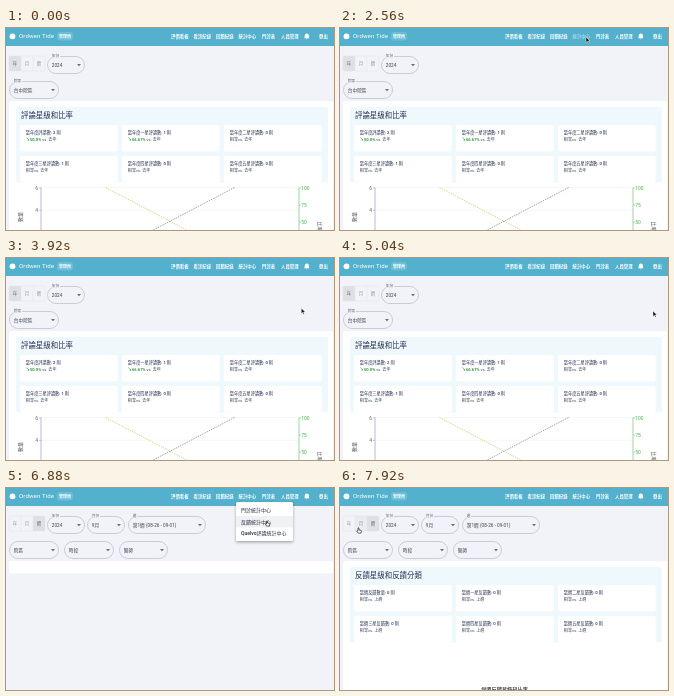
Recreate the animation shown at these times as an HTML page. Size 328 px wide and 202 px high, loop 8 s.

```html
<!DOCTYPE html>
<html lang="zh-Hant">
<head>
<meta charset="utf-8">
<title>Clinic dashboard</title>
<style>
  html, body { margin: 0; width: 100%; height: 100%; overflow: hidden; background: #f2f3f9; }
  svg { display: block; width: 100vw; height: 100vh; }
  text { font-family: Roboto, "Noto Sans CJK TC", "Noto Sans CJK JP", "Noto Sans CJK", sans-serif; white-space: pre; }
</style>
</head>
<body>
<svg id="stage" viewBox="0 0 328 202" preserveAspectRatio="none"></svg>
<script>
const LOOP = 8000, STEP = 80;
const INK = '#3c424d', NAVY = '#263052', TEAL = '#53b1cd', GREEN = '#2f8f3c';
const PURPLE = '#8f8cba', LIME = '#62b866';

const rect = (x, y, w, h, fill, r = 0, extra = '') =>
  `<rect x="${x}" y="${y}" width="${w}" height="${h}" rx="${r}" fill="${fill}" ${extra}/>`;
// y is the vertical middle of the glyphs
const text = (x, y, s, size = 4.3, fill = INK, extra = '') =>
  `<text x="${x}" y="${y + size * 0.36}" font-size="${size}" fill="${fill}" ${extra}>${s}</text>`;
const group = (id, body) => `<g id="${id}">${body}</g>`;

function header() {
  const links = [[165, '評價看板'], [187.5, '看診紀錄'], [210, '回饋紀錄'],
    [232.5, '統計中心', 'id="navStats"'], [256, '門診表'], [275, '人員管理'], [313, '登出']];
  return rect(0, 0, 328, 18, TEAL) +
    '<circle cx="6.5" cy="8.3" r="2.9" fill="#fff"/>' +
    text(13, 8.3, 'Ordwen Tide', 6.1, '#fff', 'letter-spacing=".1"') +
    rect(51, 4, 16, 8.5, '#6dbed5', 3) +
    text(53, 8.2, '管理員', 4, '#fff', 'font-weight="700"') +
    '<circle id="ripple" cx="246" cy="10" fill="#fff"/>' +
    links.map(([x, s, id]) => text(x, 8.2, s, 4.4, '#fff', 'font-weight="700" ' + (id || ''))).join('') +
    '<path d="M298.7 9.6V7.6a2.1 2.1 0 0 1 4.2 0v2l.7.7h-5.6zM300 10.7h1.6l-.8.7z" fill="#fff"/>';
}

function toggle(active) {
  return rect(3, 28, 36, 15, '#f2f3f9', 1.5) +
    rect(3 + active * 12, 28, 12, 15, '#dfe0e5', 1.5) +
    (active === 2 ? rect(15, 28, 12, 15, '#eaebf0', 0, 'id="monthHover" opacity="0"') : '') +
    rect(3, 28, 36, 15, 'none', 1.5, 'stroke="#dfe0e6" stroke-width=".5"') +
    '<path d="M15 28v15M27 28v15" stroke="#dfe0e6" stroke-width=".5"/>' +
    ['年', '月', '週'].map((s, i) =>
      text(6.8 + i * 12, 35.3, s, 4.4, i === active ? '#666a72' : '#94979e')).join('');
}

function select(x, y, w, value, label) {
  const cap = label ? rect(x + 4, y - 0.5, label.length * 3.7 + 1.6, 2, '#f2f3f9') +
    text(x + 4.8, y + 0.1, label, 3.7, '#61656f') : '';
  return rect(x + 0.5, y + 0.5, w - 1, 17, 'none', 8.5, 'stroke="#bcbec5" stroke-width=".7"') + cap +
    text(x + 4.8, y + 9, value, 4.7, INK) +
    `<path d="M${x + w - 8} ${y + 8}h4l-2 2.2z" fill="#6c6f76"/>`;
}

function cards(title, rows) {
  return rect(10, 79, 312, 75.5, '#eff8fd', 2) +
    text(15, 87, title, 7.45, NAVY, 'font-weight="500"') +
    rows.map(([name, note, drop], i) => {
      const x = 14 + (i % 3) * 102, y = i < 3 ? 97 : 128;
      const mark = drop ? `<tspan fill="${GREEN}" font-weight="700">${drop}</tspan> ` : '';
      return rect(x, y, 97.7, 26.5, '#fff', 2) +
        text(x + 5.8, y + 7.3, name, 4.2, NAVY, 'font-weight="500"') +
        text(x + 5.8, y + 14.2, mark + note, 4.1, '#3f475c');
    }).join('');
}

function chart() {
  const left = [[160, '6'], [182.3, '4']], right = [[160, '100'], [177, '75'], [194, '50']];
  const side = (x, y, s, deg) =>
    `<text transform="translate(${x} ${y}) rotate(${deg})" font-size="5" fill="#555" text-anchor="middle">${s}</text>`;
  return '<path d="M35 159.5H293M35 182.3H293" stroke="#ececef" stroke-width=".5"/>' +
    `<path d="M35 159.5V202" stroke="${PURPLE}" stroke-width=".6"/>` +
    `<path d="M293 159.5V202" stroke="${LIME}" stroke-width=".6"/>` +
    left.map(([y, s]) => `<path d="M33 ${y}h2" stroke="${PURPLE}" stroke-width=".5"/>` +
      text(32, y, s, 4.9, '#5d5b7c', 'text-anchor="end"')).join('') +
    right.map(([y, s]) => `<path d="M293 ${y}h2" stroke="${LIME}" stroke-width=".5"/>` +
      text(295.2, y, s, 4.9, '#4caf50')).join('') +
    side(16.2, 189, '數量', -90) + side(311.5, 198.5, '比率', 90) +
    // two categories, centred on the quarters of the plot
    '<g fill="none" stroke-width=".75" stroke-dasharray="1.5 1">' +
    '<path d="M99.5 159.5L228.5 227" stroke="#c3c873"/><path d="M228.5 159.5L99.5 227" stroke="#85858c"/></g>';
}

const yearly = [
  ['當年度評論數: 2 則', 'vs. 去年', '↘50.0%'],
  ['當年度一星評論數: 1 則', 'vs. 去年', '↘66.67%'],
  ...['二星評論數: 0', '三星評論數: 1', '四星評論數: 0', '五星評論數: 0']
    .map(s => [`當年度${s} 則`, '相等vs. 去年'])];
const weekly = ['反饋數量', '一星反饋數', '二星反饋數', '三星反饋數', '四星反饋數', '五星反饋數']
  .map(s => [`當週${s}: 0 則`, '相等vs. 上週']);

const reviewPage = toggle(0) + select(41, 28, 38, '2024', '年份') + select(3, 53, 50, '台中院區', '院區') +
  rect(3, 73, 324, 140, '#fff', 2) + cards('評論星級和比率', yearly) + chart();

const feedbackPage = toggle(2) + select(41, 28, 38, '2024', '年份') + select(81, 28, 38, '9月', '月份') +
  select(122, 28, 78, '第1週 (08-26 - 09-01)', '週') +
  select(3, 53, 50, '院區') + select(58, 53, 50, '時段') + select(113, 53, 49, '醫師') +
  rect(3, 73, 324, 12.5, '#fff', 1.5) +
  group('loaded', rect(3, 73, 324, 140, '#fff', 2) + cards('反饋星級和反饋分類', weekly) +
    text(164.5, 202.3, '當週反饋星級和比率', 5.2, INK, 'font-weight="700" text-anchor="middle"'));

const menu = rect(230, 14, 57, 39, '#fff', 1.5, 'filter="url(#drop)"') +
  rect(230, 0, 57, 11.5, '#f0f1f3', 0, 'id="hover"') +
  ['門診統計中心', '反饋統計中心', 'Quelvo評論統計中心'].map((s, i) =>
    text(235, 22.2 + i * 11.5, s, 5, '#252c42', 'font-weight="500"')).join('');

const arrow = '<path d="M0 0V5.4L1.3 4.3L2.2 6.2L3.1 5.8L2.2 3.9H3.9Z" fill="#111" stroke="#fff" stroke-width=".45"/>';
const hand = '<path transform="scale(.85)" d="M-.6 .2Q0-.6 .6 .2V2.3L2.9 2.8Q3.5 3 3.3 3.8L2.8 6H-.4L-2.1 3.7Q-1.9 2.9-.6 3.6Z" fill="#fff" stroke="#111" stroke-width=".75"/>';

const stage = document.getElementById('stage');
stage.innerHTML =
  '<defs><filter id="drop" x="-20%" y="-20%" width="140%" height="150%">' +
  '<feDropShadow dx="0" dy="1.3" stdDeviation="1.6" flood-color="#000" flood-opacity=".35"/></filter></defs>' +
  rect(0, 0, 328, 202, '#f2f3f9') + group('review', reviewPage) + group('feedback', feedbackPage) +
  header() + group('menu', menu) + group('cursor', group('arrow', arrow) + group('hand', hand));

const el = id => document.getElementById(id);
const show = (id, on) => el(id).setAttribute('visibility', on ? 'inherit' : 'hidden');
const clamp = v => Math.max(0, Math.min(1, v));
const ease = p => p * p * (3 - 2 * p);

// time, x, y of the pointer tip
const path = [[960, 306, 198], [1360, 241, 14], [1440, 241, 13], [1760, 246, 9], [2800, 246, 9],
  [3280, 257, 44], [3520, 257, 44], [4160, 313, 53], [5040, 313, 53], [5760, 246.5, 10],
  [6320, 246.5, 10], [6720, 261, 33], [7040, 261, 33], [7600, 100, 47], [7920, 18.5, 40]];
// opening and closing start times
const menus = [[2640, 3600], [6160, 6960]];

function pointer(t) {
  const i = path.findIndex(p => p[0] > t);
  if (i < 0) return path[path.length - 1].slice(1);
  if (i === 0) return path[0].slice(1);
  const [t0, x0, y0] = path[i - 1], [t1, x1, y1] = path[i];
  const p = ease((t - t0) / (t1 - t0));
  return [x0 + (x1 - x0) * p, y0 + (y1 - y0) * p];
}

function draw(t) {
  const [x, y] = pointer(t);
  const next = t >= 6800;
  show('review', !next);
  show('feedback', next);
  show('loaded', next && t >= 7200);

  let alpha = 0, grow = 1, wave = 0;
  for (const [open, close] of menus) {
    if (t < open || t > close + 240) continue;
    const rise = clamp((t - open) / 240);
    alpha = Math.min(rise, 1 - clamp((t - close) / 200));
    grow = t < close ? 1 - 0.25 * (1 - rise) ** 2 : 1;
    wave = clamp((t - open) / 400);
  }
  el('menu').setAttribute('opacity', alpha);
  el('menu').setAttribute('transform',
    `translate(230 14) scale(${grow} ${grow * grow}) translate(-230 -14)`);
  el('ripple').setAttribute('r', 4 + 10 * wave);
  el('ripple').setAttribute('opacity', wave > 0 ? 0.25 * (1 - wave) : 0);
  const row = Math.floor((y - 16.5) / 11.5);
  const inMenu = alpha > 0 && x > 230 && x < 287 && row >= 0 && row < 3;
  show('hover', inMenu);
  el('hover').setAttribute('y', 16.5 + row * 11.5);

  const onNav = t >= 960 && x > 230 && x < 252 && y < 12;
  el('navStats').setAttribute('opacity', onNav ? 0.5 : 1);
  const onMonth = next && x > 15 && x < 27 && y > 28 && y < 43;
  el('monthHover').setAttribute('opacity', onMonth ? 1 : 0);

  const pointing = inMenu || onMonth;
  show('cursor', t >= 960);
  show('arrow', !pointing);
  show('hand', pointing);
  el('cursor').setAttribute('transform', `translate(${x} ${y})`);
}

function tick() {
  draw(Math.floor((performance.now() % LOOP) / STEP) * STEP);
  requestAnimationFrame(tick);
}
tick();
</script>
</body>
</html>
```
